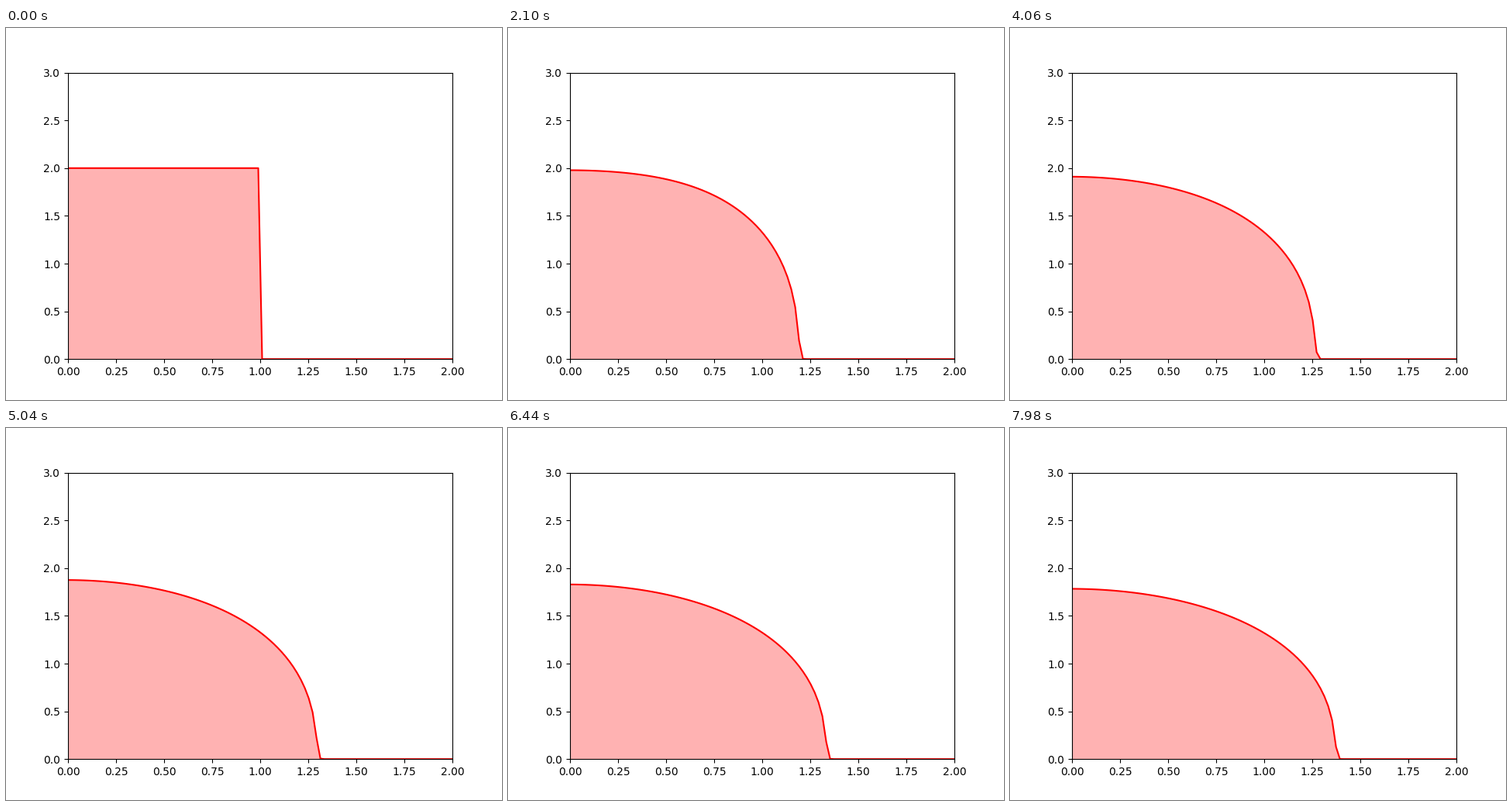
Write a matplotlib script that moves like this. It is 640 px wide and 480 px high and loops after 8000 ms.

```python
import numpy as np
import matplotlib.pyplot as plt
from matplotlib.animation import FuncAnimation

# Nonlinear heat conduction, T_t = (T^(5/2) T_x)_x, spreading from a hot slab
POWER = 2.5
STEP_TIME = 0.00127   # model time between two shown states
SUBSTEPS = 50
STATES = 58
TICK = 20             # ms
HOLD = 7              # ticks per state
TICKS = 400

x = np.linspace(0, 2, 100)
dx = x[1] - x[0]
dt = STEP_TIME / SUBSTEPS


def advance(temp):
    """One explicit finite-volume step with insulated ends."""
    k = temp ** POWER
    flux = np.zeros(temp.size + 1)
    flux[1:-1] = -0.5 * (k[1:] + k[:-1]) * np.diff(temp) / dx
    return temp - dt * np.diff(flux) / dx


def solve():
    temp = np.where(x < 1, 2.0, 0.0)
    states = [temp]
    for _ in range(STATES - 1):
        for _ in range(SUBSTEPS):
            temp = advance(temp)
        states.append(temp)
    return states


def area(temp):
    top = np.column_stack([x, temp])
    return np.vstack([[x[0], 0], top, [x[-1], 0]])


states = solve()

fig, ax = plt.subplots(figsize=(6.4, 4.8), dpi=100)
ax.set_xlim(0, 2)
ax.set_ylim(0, 3)
line, = ax.plot(x, states[0], color="red", lw=1.5)
fill = ax.fill_between(x, states[0], facecolor="red", alpha=0.3)


def update(tick):
    temp = states[min(tick // HOLD, STATES - 1)]
    line.set_ydata(temp)
    fill.set_verts([area(temp)])
    return line, fill


anim = FuncAnimation(fig, update, frames=TICKS, interval=TICK,
                     repeat=True, repeat_delay=0, blit=False)
plt.show()
```
